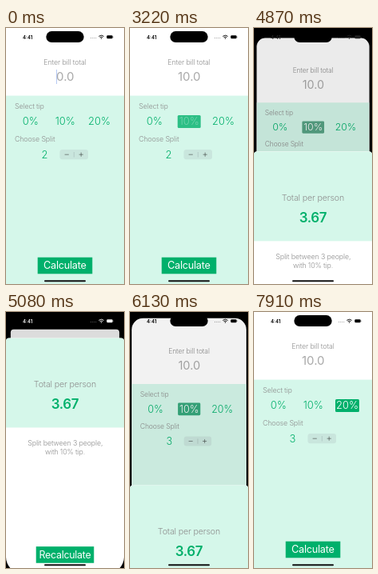
Recreate the animation shown at these times as an HTML page. Size 148 by 320 pixels, loop 8 s.

```html
<!DOCTYPE html>
<html lang="en">
<head>
<meta charset="utf-8">
<title>Tip calculator</title>
<style>
  html, body { margin: 0; width: 100%; height: 100%; overflow: hidden; background: #000; }
  #stage { position: relative; width: 148px; height: 320px; overflow: hidden; }
  .layer { position: absolute; left: 0; top: 0; width: 148px; height: 320px; overflow: hidden; }
  svg { display: block; }
  #card { background: #fff; transform-origin: 50% 0; }
  #dim { background: #000; }
  #sheet { height: 294px; background: #fff; border-radius: 4px 4px 20px 20px; }
  text { font-family: Inter, Roboto, sans-serif; text-anchor: middle; }
  .label { font-size: 8.8px; font-weight: 300; letter-spacing: -.012em; fill: #8e8e8e; }
  .left { text-anchor: start; }
  .bill { font-size: 15px; fill: #a9a9a9; }
  .value { font-size: 12.9px; font-weight: 300; fill: #00b06b; }
  .button { font-size: 12.7px; letter-spacing: -.02em; fill: #fff; }
  .panel { fill: #d5f7ea; }
  .green { fill: #00b06b; }
</style>
</head>
<body>
<div id="stage">
  <div id="card" class="layer">
    <svg width="148" height="320">
      <rect class="panel" y="84.6" width="148" height="236"/>
      <text class="label" x="74" y="45.9">Enter bill total</text>
      <text class="bill" id="bill" x="74.3" y="66.3"></text>
      <rect id="caret" y="52" width="1" height="18" fill="#5b86e6"/>
      <text class="label left" x="11" y="101.2">Select tip</text>
      <g id="tips"></g>
      <text class="label left" x="11" y="142.2">Choose Split</text>
      <text class="value" id="split" x="48.5" y="162.6"></text>
      <rect x="67.5" y="152" width="35.5" height="12.3" rx="3" fill="#767680" opacity=".13"/>
      <rect id="press" x="85.5" y="152" width="17.5" height="12.3" rx="3" fill="#767680"/>
      <path d="M85.3 155v6.5" stroke="#3c3c43" stroke-opacity=".3" stroke-width=".5"/>
      <path d="M73.6 158.2h5.2M91.6 158.2h5.2M94.2 155.6v5.2" stroke="#222" stroke-width=".5"/>
      <rect class="green" x="39.7" y="286.7" width="68.6" height="20.6"/>
      <text class="button" id="calculate" x="73.8" y="301.2">Calculate</text>
    </svg>
    <div id="dim" class="layer"></div>
  </div>
  <div id="sheet" class="layer">
    <svg width="148" height="294">
      <rect class="panel" width="148" height="112"/>
      <text class="label" x="74" y="61.6" style="font-size:10.6px">Total per person</text>
      <text class="green" x="74" y="89" font-size="16.9" font-weight="600" letter-spacing="-.3">3.67</text>
      <text class="label" x="74.3" y="135">Split between 3 people,</text>
      <text class="label" x="74" y="145.8">with 10% tip.</text>
      <rect class="green" x="37.7" y="260.7" width="72.6" height="20.6"/>
      <text class="button" x="74" y="275.2" style="font-size:12.4px">Recalculate</text>
    </svg>
  </div>
  <svg class="layer" width="148" height="320">
    <rect x="50.3" y="4.1" width="47.4" height="13.9" rx="6.95"/>
    <g id="status">
      <text x="27.2" y="13.5" font-size="6" font-weight="600">4:41</text>
      <path d="M106 12.5h7.5" stroke="currentColor" stroke-width="1" stroke-dasharray="1 1.1" opacity=".35"/>
      <path d="M116.3 10.4q3.2-2.6 6.4 0M117.6 11.8q1.9-1.5 3.8 0" fill="none" stroke="currentColor" stroke-width=".9"/>
      <circle cx="119.5" cy="13" r=".7"/>
      <rect x="126.3" y="9.3" width="7.4" height="4" rx="1.2"/>
      <rect x="134.2" y="10.6" width=".6" height="1.4" opacity=".5"/>
    </g>
    <rect x="48" y="315.3" width="52" height="2" rx="1" fill="#111"/>
  </svg>
</div>
<script>
const LOOP = 8000, GREEN = '#00b06b';
const $ = id => document.getElementById(id);

$('tips').innerHTML = [['0%', 30.8, 22], ['10%', 74.2, 29], ['20%', 117, 30]].map(([label, x, w]) =>
  `<g><rect x="${x - w / 2}" y="108.9" width="${w}" height="16.1" rx="1.5"/>
   <text class="value" x="${x}" y="121.4">${label}</text></g>`).join('');
const tips = [...$('tips').children];

// Piecewise linear value through [time, value] points
function track(t, points) {
  let [t0, v0] = points[0];
  for (const [t1, v1] of points) {
    if (t < t1) return v0 + (v1 - v0) * Math.max(0, (t - t0) / (t1 - t0));
    [t0, v0] = [t1, v1];
  }
  return v0;
}

// Critically damped spring from 0 to 1
function spring(ms) {
  const x = Math.max(0, ms) * .01826;
  return 1 - (1 + x) * Math.exp(-x);
}

const tapAlpha = ms => track(ms, [[0, 1], [70, .3], [260, .3], [590, 1]]);
const CARET = [[0, .45], [70, 0], [280, 0], [390, 1], [910, 1], [1020, 0], [1080, 0], [1190, 1],
  [1630, 1], [1790, 0], [2030, 0], [2140, 1], [2660, 1], [2770, 0]];

function draw(t) {
  const typed = t >= 1080;
  $('bill').textContent = typed ? '10.0' : '0.0';
  $('caret').setAttribute('x', typed ? 66 : 63);
  $('caret').setAttribute('opacity', track(t, CARET));

  const open = t < 5990 ? spring(t - 4767.5) : 1 - spring(t - 6010);
  const selected = t < 3200 ? -1 : t < 7570 ? 1 : 2;
  const alphas = [1, tapAlpha(t - 2950), tapAlpha(t - 7320)];
  tips.forEach((tip, i) => {
    const [box, label] = tip.children, on = i === selected;
    box.style.fill = on ? `color-mix(in srgb, #9a9a9a ${open * 100}%, ${GREEN})` : 'none';
    box.style.opacity = .7 + .3 * alphas[i];
    label.style.fill = on ? '#fff' : GREEN;
    label.style.opacity = alphas[i];
  });

  $('split').textContent = t < 3750 ? 2 : 3;
  $('press').setAttribute('opacity', track(t, [[3740, 0], [3760, .2], [3850, .2], [3990, 0]]));
  $('calculate').setAttribute('opacity', track(t, [[4720, 1], [4730, .3], [5130, 1]]));

  const presenting = t >= 4730 && t < 7320;
  $('card').style.transform = `translateY(${22.2 * open}px) scale(${1 - .081 * open})`;
  $('card').style.borderRadius = presenting ? 20.7 - 16.9 * open + 'px' : 0;
  $('dim').style.opacity = .14 * open;
  $('sheet').style.transform = `translateY(${320 - 294 * open}px)`;
  $('sheet').style.visibility = open > .001 ? 'visible' : 'hidden';

  // The status bar turns white in the second half of the presentation
  const shade = Math.round(255 * Math.max(0, 2 * open - 1));
  $('status').style.color = $('status').style.fill = `rgb(${shade},${shade},${shade})`;
}

const start = performance.now();
(function tick() {
  draw((performance.now() - start) % LOOP);
  requestAnimationFrame(tick);
})();
</script>
</body>
</html>
```
